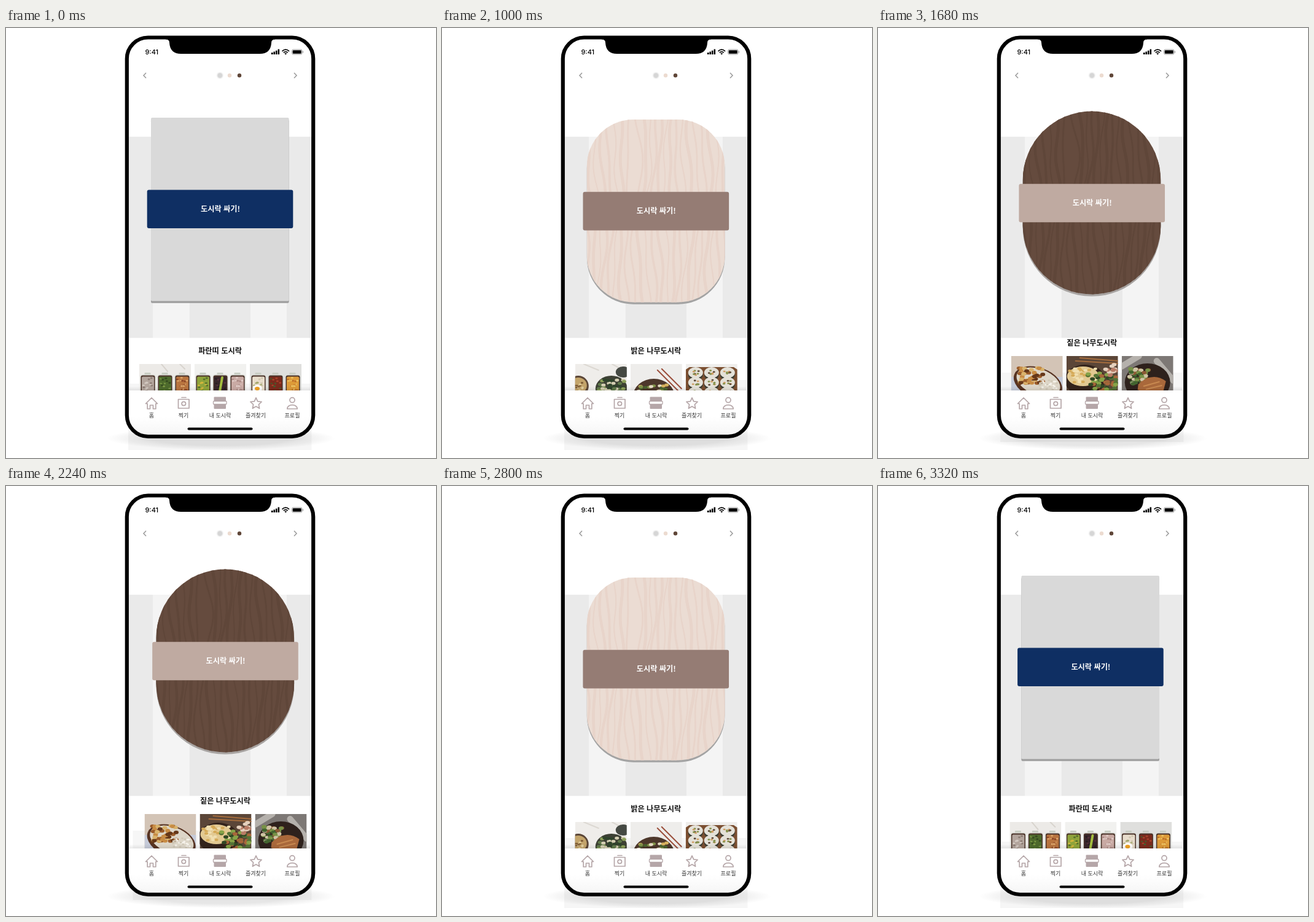
An HTML page for the animation above (3.84 s loop, 700 by 700 pixels).

```html
<!DOCTYPE html>
<html lang="ko">
<head>
<meta charset="utf-8">
<title>Lunchbox carousel</title>
<style>
  html, body { margin: 0; width: 100%; height: 100%; overflow: hidden; background: #fff; }
  svg { display: block; width: 100vw; height: 100vh; }
  text { font-family: "Noto Sans CJK KR", "Noto Sans CJK", "Noto Sans", sans-serif; text-anchor: middle; }
  .title { font-size: 12.2px; font-weight: 700; fill: #111; }
  .cta { font-size: 12.2px; font-weight: 700; fill: #fff; }
  .tab { font-size: 9px; fill: #333; }
  .icon { fill: none; stroke: #b5a6a8; stroke-width: 1.7; stroke-linejoin: round; stroke-linecap: round; }
  .chevron { fill: none; stroke: #999; stroke-width: 1.5; }
</style>
</head>
<body>
<svg viewBox="0 0 700 700">
  <defs>
    <radialGradient id="floor">
      <stop offset=".6" stop-color="#000" stop-opacity=".1"/>
      <stop offset=".85" stop-color="#000" stop-opacity=".04"/>
      <stop offset="1" stop-color="#000" stop-opacity="0"/>
    </radialGradient>
    <linearGradient id="lift" x2="0" y2="1">
      <stop stop-color="#000" stop-opacity="0"/>
      <stop offset="1" stop-color="#000" stop-opacity=".08"/>
    </linearGradient>
    <linearGradient id="navFill" x2="0" y2="1">
      <stop offset=".6" stop-color="#fff"/>
      <stop offset="1" stop-color="#f6f6f6"/>
    </linearGradient>
    <filter id="soft" x="-1" y="-1" width="3" height="3"><feGaussianBlur stdDeviation="1.2"/></filter>
    <clipPath id="screen"><rect x="199" y="19" width="298.5" height="668"/></clipPath>
    <clipPath id="photo"><rect width="84" height="84"/></clipPath>
  </defs>

  <ellipse cx="350" cy="668" rx="186" ry="19" fill="url(#floor)"/>
  <rect x="197" y="15.500" width="303" height="649.500" rx="34.500" fill="#fff"/>
  <g id="stripes"></g>
  <g id="slides" clip-path="url(#screen)"></g>

  <rect x="200" y="583" width="296" height="7" fill="url(#lift)"/>
  <path d="M200 590H496V630Q496 662 464 662H232Q200 662 200 630Z" fill="url(#navFill)"/>
  <g class="icon">
    <path d="M227.500 611.500L237 602L246.500 611.500H243.800V620H239.500V614H234.500V620H230.200V611.500Z"/>
    <rect x="280.500" y="604.500" width="17.500" height="14.500"/>
    <circle cx="289.300" cy="611.500" r="3.200"/>
    <path d="M286 601.500H293"/>
    <path id="star"/>
    <circle cx="466" cy="605.700" r="4"/>
    <path d="M457.800 620C457.800 611.500 474.200 611.500 474.200 620Z"/>
  </g>
  <g fill="#b5a6a8">
    <rect x="338.500" y="600.500" width="19.500" height="7" rx="1"/>
    <rect x="338.500" y="612.500" width="19.500" height="7.500" rx="1"/>
    <rect x="337.500" y="607.500" width="21.500" height="5" rx="1" fill="#fff" stroke="#b5a6a8" stroke-width="1.300"/>
  </g>
  <g id="tabs"></g>
  <rect x="295.500" y="650.500" width="106" height="4" rx="2"/>

  <text x="237.300" y="43" style="font:500 11px Inter,sans-serif">9:41</text>
  <path d="M433.200 43V40M436.700 43V38.500M440.200 43V36.700M443.800 43V34.500" stroke="#000" stroke-width="2.500"/>
  <path d="M449.500 37.800Q455.200 32.600 461 37.800M451.800 40.200Q455.200 37 458.700 40.200" fill="none" stroke="#000" stroke-width="1.700"/>
  <path d="M453.300 41.500Q455.200 40 457.200 41.500L455.200 43.500Z"/>
  <rect x="465.500" y="35" width="16.500" height="8" rx="2.300" fill="#fff" stroke="#888" stroke-width=".8"/>
  <rect x="466.700" y="36.200" width="14.100" height="5.600" rx="1.200"/>
  <path d="M483.300 37.500V40.500" stroke="#888"/>

  <path class="chevron" d="M228 73L224 77.300L228 81.600M469 73L473 77.300L469 81.600"/>
  <circle cx="348.300" cy="77.300" r="4.300" fill="#ccc" filter="url(#soft)"/>
  <circle cx="348.300" cy="77.300" r="3.200" fill="#d6d6d6"/>
  <circle cx="364" cy="77.300" r="3.200" fill="#ecdbd0"/>
  <circle cx="380" cy="77.300" r="3.200" fill="#5f4638"/>

  <rect x="196.800" y="15.500" width="303.400" height="649.500" rx="34.500" fill="none" stroke="#000" stroke-width="6.200"/>
  <path d="M260 15H438V18.500Q432 18.500 432 24Q431 42 413 42H285Q267 42 266 24Q266 18.500 260 18.500Z"/>
</svg>

<script>
const $ = id => document.getElementById(id);
const rect = (x, y, w, h, fill, rx = 0, extra = '') =>
  `<rect x="${x}" y="${y}" width="${w}" height="${h}" rx="${rx}" fill="${fill}" ${extra}/>`;
const oval = (x, y, rx, ry, fill) => `<ellipse cx="${x}" cy="${y}" rx="${rx}" ry="${ry}" fill="${fill}"/>`;
const line = (d, color, w) => `<path d="${d}" fill="none" stroke="${color}" stroke-width="${w}" stroke-linecap="round"/>`;
const label = (x, y, cls, text) => `<text x="${x}" y="${y}" class="${cls}">${text}</text>`;

// Seeded specks give food its texture
function specks(x, y, w, h, colors, count, size = 2) {
  let seed = x * 31 + y * 17 + count, out = '';
  const rnd = () => (seed = (seed * 16807 + 11) % 2147483647) / 2147483647;
  rnd(); rnd();
  for (let i = 0; i < count; i++)
    out += oval((x + rnd() * w).toFixed(1), (y + rnd() * h).toFixed(1), size, size * .7, colors[i % colors.length]);
  return out;
}

const tray = (x, colors) =>
  rect(x + 7, 14, 10, 4, '#c9cec4', 1) +
  rect(x, 17, 25, 56, '#dcded8', 4) + rect(x + 1, 18.5, 23, 53, '#4a3229', 3) +
  rect(x + 2.5, 20.5, 20, 49, colors[0], 2) +
  specks(x + 4, 22, 17, 46, colors, 44);

const trays = (bg, ...fills) => rect(0, 0, 84, 84, bg) + fills.map((c, i) => tray(1.5 + i * 28, c)).join('');

function rolls() {
  let out = rect(0, 0, 84, 84, '#efeeec') + `<path d="M0 9L6 5H78L84 9V84H0Z" fill="#7b4f31"/>`;
  for (let row = 0; row < 4; row++)
    for (let col = 0; col < 3; col++) {
      const x = 16 + col * 26, y = 14 + row * 16;
      out += oval(x, y + 3, 12, 10, '#3b3d33') + oval(x, y, 12, 9, '#e4e1d8') +
        specks(x - 6, y - 4, 11, 8, ['#86924b', '#cf9c63', '#5b4634'], 7);
    }
  return out;
}

const photos = {
  blue: [
    trays('#eceae7', ['#b3a59d', '#8c7c74', '#d2c8c0'], ['#4d6a2c', '#33481f', '#7d9a45'], ['#b8743f', '#8a4426', '#dba468']) +
      line('M36 0L46 12M66 0L74 8', '#d8d4ce', 2),
    trays('#f1f1ef', ['#8fa33b', '#55702b', '#d2b53c'], ['#38262a', '#55303a', '#211a1c'], ['#c9aaa4', '#a98883', '#e0cbc6']) +
      line('M45 22L40 50', '#a4bd3e', 4),
    trays('#dfdfdd', ['#e8ddcc', '#d2c8b2', '#a5aa70'], ['#7a2a1c', '#a8412a', '#41602d'], ['#dd9a38', '#bd6f28', '#ecc260']) +
      oval(12, 40, 8, 6, '#fff') + oval(12, 40, 4, 3, '#f0a324')
  ],
  light: [
    rect(0, 0, 84, 84, '#efedea') + line('M14 0L38 10M60 0L84 13', '#dcd8d2', 2) +
      oval(5, 36, 17, 17, '#5a4536') + oval(5, 35, 14, 13, '#c3a46b') + specks(0, 27, 14, 16, ['#e2cf9e', '#7d5b35'], 14) +
      oval(59, 40, 26, 21, '#3d4034') + specks(38, 25, 42, 30, ['#60794a', '#2f432b', '#d4ceb2', '#8ca05a'], 60, 3.5) +
      oval(78, 13, 12, 9, '#454943') + rect(0, 58, 84, 26, '#a65d32'),
    rect(0, 0, 84, 84, '#eeedeb') + oval(38, 53, 34, 29, '#4d372b') +
      specks(13, 33, 48, 42, ['#819248', '#d6b25e', '#e8ddc5', '#4a622e'], 60, 3.5) +
      line('M44 10L80 46M51 8L83 40', '#9b4f3c', 2),
    rolls()
  ],
  dark: [
    rect(0, 0, 84, 84, '#d3c4b6') + rect(0, 34, 84, 50, '#c5cad8') +
      `<g transform="rotate(20 44 43)">${oval(44, 44, 41, 25, '#573322')}${oval(44, 42, 37, 21, '#ddd6c8')}</g>` +
      specks(12, 19, 40, 26, ['#9b5c2a', '#c88c44', '#653719', '#d9b36c'], 48, 4) +
      specks(45, 39, 30, 17, ['#f5f2ea', '#d0c8b7'], 28) + rect(0, 70, 84, 14, '#72432d'),
    rect(0, 0, 84, 84, '#5b4638') + line('M15 8L84 12M22 3L84 8', '#a56d3e', 2) +
      oval(30, 39, 33, 25, '#33231b') + oval(27, 33, 26, 16, '#e2c992') +
      specks(3, 19, 46, 26, ['#f0dfb1', '#d5aa58'], 34, 3) +
      specks(35, 27, 46, 44, ['#557337', '#86a348', '#304824', '#a8663a'], 64, 4) +
      specks(61, 14, 20, 18, ['#e4d0bd', '#b97c66'], 14, 4),
    rect(0, 0, 84, 84, '#7d7875') + line('M0 17L28 0M57 8L84 40', '#b5b1ac', 10) +
      oval(42, 43, 37, 31, '#2e211c') + specks(13, 20, 31, 27, ['#42642f', '#789247', '#cfc3a4', '#8d5a34'], 42, 4) +
      `<path d="M27 46Q50 25 72 41L68 56Q45 62 26 55Z" fill="#a9683b"/>` +
      line('M36 49L61 42M40 54L65 48', '#c88950', 2)
  ]
};

// Wavy wood lines, bulging around a knot
function grain(color, top, width, amp) {
  let out = '';
  for (let i = 0; i < 24; i++) {
    const pts = [];
    for (let y = top; y <= top + 300; y += 10) {
      const side = i < 8 ? -1 : 1;
      const bulge = side * 10 * Math.exp(-(((y - top - 85) / 45) ** 2)) * Math.exp(-Math.abs(i - 7.5) / 4);
      const x = 234 + i * 10 + bulge + amp * Math.sin(y / 48 + i * .45) + 2 * Math.sin(y / 17 + i * 1.9);
      pts.push(`${x.toFixed(1)} ${y}`);
    }
    out += line('M' + pts.join('L'), color, width + 1.5 * Math.sin(i * 2.3));
  }
  return out;
}

const slideData = [
  { key: 'blue', title: '파란띠 도시락', x: 236, y: 146, h: 298.5, r: 2, body: '#d9d9d9', edge: '#9e9e9e',
    band: '#0f2f63', bandY: 263.5, photoY: 547, plateY: 579 },
  { key: 'light', title: '밝은 나무도시락', x: 236, y: 149, h: 297.5, r: 76, body: '#ebdcd3', edge: '#a3a3a3',
    wood: '#e8d4ca', band: '#957c74', bandY: 266.8, photoY: 547, plateY: 573 },
  { key: 'dark', title: '짙은 나무도시락', x: 235.7, y: 135.5, h: 298, r: 112, body: '#654b3e', edge: '#a8a4a2',
    wood: '#5f4639', band: '#bfaaa1', bandY: 253.7, photoY: 534, plateY: 561 }
];

function slide(s) {
  const { x, y, h, r } = s, mid = x + 112.5;
  const clip = `<clipPath id="${s.key}Clip">${rect(x, y, 224.6, h, '#000', r)}</clipPath>`;
  const wood = s.wood ? `<g clip-path="url(#${s.key}Clip)">${grain(s.wood, y, 3.5, 5)}</g>` : '';
  const pics = photos[s.key].map((p, i) =>
    `<g transform="translate(${x - 19 + i * 90} ${s.photoY})" clip-path="url(#photo)">${p}</g>`).join('');
  return `<g id="${s.key}">${clip}` +
    rect(x - 38, s.plateY, 302, s.photoY + 140 - s.plateY, '#000', 0, 'opacity=".035"') +
    rect(x, y + 3.3, 224.6, h, s.edge, r) + rect(x, y, 224.6, h, s.body, r) + wood +
    rect(x - 6.3, s.bandY, 237.6, 62.6, s.band, 3) +
    label(mid + .5, s.bandY + 35.3, 'cta', '도시락 싸기!') +
    label(mid, s.photoY - 17.5, 'title', s.title) + pics + '</g>';
}

$('stripes').innerHTML = [[199, 40, '#eaeaea'], [239, 59.5, '#f4f4f4'], [298.5, 99.5, '#e9e9e9'],
  [398, 59, '#f4f4f4'], [457, 41, '#eaeaea']].map(([x, w, c]) => rect(x, 177, w, 327.5, c)).join('');
$('slides').innerHTML = slideData.map(slide).join('');
$('tabs').innerHTML = [[237, '홈'], [289, '찍기'], [348.5, '내 도시락'], [406.5, '즐겨찾기'], [466, '프로필']]
  .map(([x, t]) => label(x, 633.5, 'tab', t)).join('');
$('star').setAttribute('d', 'M' + Array.from({ length: 10 }, (_, i) => {
  const a = i * Math.PI / 5, r = i % 2 ? 4.6 : 9.6;
  return `${(407 + r * Math.sin(a)).toFixed(1)} ${(611.5 - r * Math.cos(a)).toFixed(1)}`;
}).join('L') + 'Z');

// cubic-bezier(.42, 0, .58, 1)
function ease(u) {
  if (u <= 0 || u >= 1) return u <= 0 ? 0 : 1;
  let lo = 0, hi = 1, s = u;
  for (let i = 0; i < 24; i++) {
    s = (lo + hi) / 2;
    const x = 1.26 * s * (1 - s) ** 2 + 1.74 * s * s * (1 - s) + s ** 3;
    if (x < u) lo = s; else hi = s;
  }
  return s * s * (3 - 2 * s);
}

const LOOP = 3840, STEP = 40, LAST = 3320;
const moves = [
  { start: 328, length: 612, out: 0, to: -439, into: 1, from: 439 },
  { start: 990, length: 670, out: 1, to: -459, into: 2, from: 459 },
  { start: 2186, length: 625, out: 2, to: 600, into: 1, from: -459 },
  { start: 2825, length: 524, out: 1, to: 586, into: 0, from: -439 }
];
const groups = slideData.map(s => $(s.key));
const began = performance.now();

function draw() {
  const now = (performance.now() - began) % LOOP;
  const t = Math.min(Math.floor(now / STEP) * STEP, LAST);
  const offsets = [0, 600, 600];
  for (const m of moves) {
    if (t < m.start) break;
    const p = ease((t - m.start) / m.length);
    offsets[m.out] = m.to * p;
    offsets[m.into] = m.from * (1 - p);
  }
  groups.forEach((g, i) => g.setAttribute('transform', `translate(${offsets[i].toFixed(2)} 0)`));
  requestAnimationFrame(draw);
}
draw();
</script>
</body>
</html>
```
